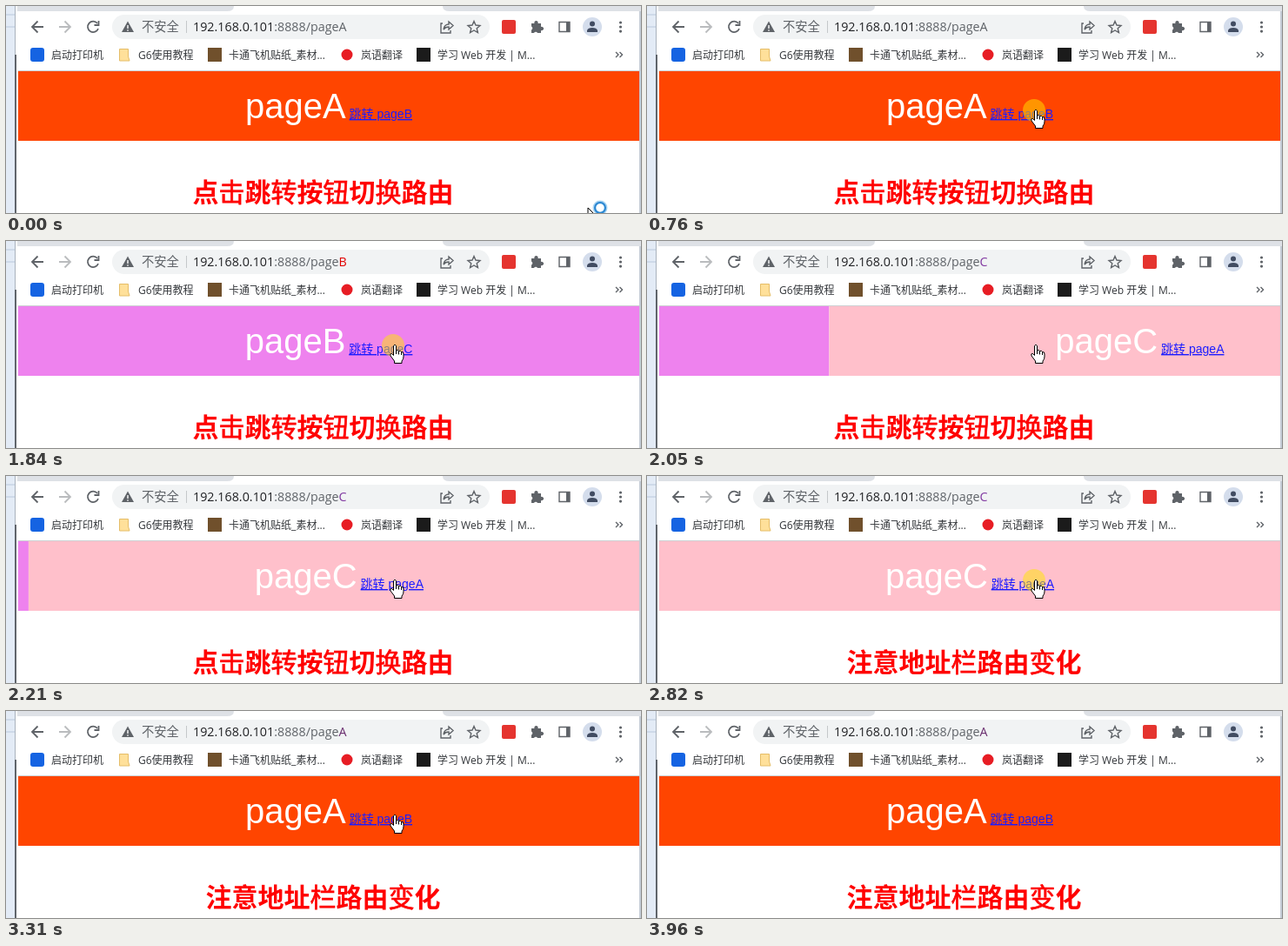
Recreate the animation shown at these times as an HTML page. Size 730 by 238 pixels, loop 4 s.

```html
<!DOCTYPE html>
<html lang="zh-CN">
<head>
<meta charset="utf-8">
<title>Route transition</title>
<style>
  html, body { margin: 0; height: 100%; overflow: hidden; background: #fff; }
  svg { display: block; width: 730px; height: 238px; }
  text { white-space: pre; }
  .ui { font-family: "Open Sans", "Noto Sans CJK SC", sans-serif; }
  .bookmarks { font-size: 12px; fill: #34373b; }
  .line { fill: none; stroke: #5f6368; stroke-width: 1.8; }
  .fine { stroke-width: 1.4; }
  .page { font: 40px "Liberation Sans", Arial, "Noto Sans CJK SC", sans-serif; }
  .gap { font-size: 14px; }
  .link { font-size: 14px; fill: #1c1cff; text-decoration: underline 1px; }
  .caption { font: bold 30px "Noto Sans CJK SC", sans-serif; fill: red; }
  .thin { font-weight: 400; stroke: red; stroke-width: .7; }
  .pointer { fill: #fff; stroke: #000; stroke-linejoin: round; }
</style>
</head>
<body>
<svg viewBox="0 0 730 238">
  <clipPath id="view"><rect x="14" y="75" width="714" height="80"/></clipPath>

  <!-- window frame and tab strip -->
  <rect width="730" height="238" fill="#fff"/>
  <rect width="10" height="238" fill="#e3ebf6"/>
  <path d="M0 10H10M0 24H10" stroke="#b9c8dc"/>
  <path d="M10.500 0V56" stroke="#a9b2bd"/>
  <path d="M11 56V238" stroke="#60656b" stroke-width="2"/>
  <path d="M13 0H730V6H13Z" fill="#dee1e6"/>
  <path d="M254 6q8 0 8 -6H502q0 6 8 6Z" fill="#fff"/>
  <path d="M14 74.5H728" stroke="#cdcfd2"/>
  <path d="M729 6V238" stroke="#c3cbd5" stroke-width="2"/>

  <!-- toolbar -->
  <g class="line">
    <path d="M43 24H30M36.5 17.5L30 24L36.5 30.5"/>
    <path d="M61 24H74M67.5 17.5L74 24L67.5 30.5" style="stroke:#babcbe"/>
    <path d="M105 20A6.2 6.2 0 1 0 106 26M106.5 17V22H101.5"/>
  </g>
  <rect x="122" y="10" width="434" height="28" rx="14" fill="#f1f3f4"/>
  <path d="M140 17.5L147 30H133Z" fill="#5f6368"/>
  <path d="M140 22V26M140 27.3V28.7" stroke="#fff" stroke-width="1.4"/>
  <path d="M207.5 17V31" stroke="#c4c7ca"/>
  <g class="ui" font-size="14.3" fill="#5f6368">
    <text x="156" y="29">不安全</text>
    <text x="215" y="29"><tspan fill="#202124">192.168.0.101</tspan>:8888/page<tspan id="letter"></tspan></text>
  </g>
  <g class="line fine">
    <path d="M502 20H500V31H511V28M503 27Q504 21 509 21V18L514 22.5L509 27V24Q505 24 503 27Z"/>
    <path d="M538 17.5L540 22L545 22.5L541.2 25.7L542.4 30.5L538 28L533.6 30.5L534.8 25.7L531 22.5L536 22Z"/>
    <path d="M636 18.5H648V29.5H636Z"/>
  </g>
  <rect x="570" y="16" width="16" height="16" rx="2" fill="#e5342f"/>
  <path d="M604 20H607.5A2.2 2.2 0 1 1 611.5 20H615V24A2.2 2.2 0 1 1 615 28V31H611A2.2 2.2 0 0 0 607 31H604V27.5A2.2 2.2 0 0 0 604 23.5Z" fill="#5f6368"/>
  <path d="M644 18.5H648V29.5H644Z" fill="#5f6368"/>
  <circle cx="674" cy="24" r="11" fill="#d4ddec"/>
  <g fill="#414c62">
    <circle cx="674" cy="20.5" r="3"/>
    <path d="M668 30V28Q669 25 674 25T680 28V30Z"/>
  </g>
  <path d="M706.5 19v.01m0 5v.01m0 5v.01" stroke="#5f6368" stroke-width="3.2" stroke-linecap="round"/>

  <!-- bookmarks -->
  <rect x="28" y="48" width="16" height="16" rx="3" fill="#1563e2"/>
  <path d="M130.5 49.5H140.5V58L142 63H130.5Z" fill="#ffe09a" stroke="#e5bd68"/>
  <rect x="232" y="48" width="16" height="16" fill="#70502c"/>
  <circle cx="392" cy="56" r="6.5" fill="#e71d24"/>
  <rect x="472" y="48" width="16" height="16" fill="#1b1b1b"/>
  <g class="ui bookmarks">
    <text x="52" y="61">启动打印机</text>
    <text x="152" y="61">G6使用教程</text>
    <text x="256" y="61">卡通飞机贴纸_素材...</text>
    <text x="408" y="61">岚语翻译</text>
    <text x="496" y="61">学习 Web 开发 | M...</text>
  </g>
  <path class="line fine" d="M701 53L704 56L701 59M705.5 53L708.5 56L705.5 59"/>

  <g id="pages" clip-path="url(#view)"></g>
  <text id="caption" class="caption" x="364.5" y="225" text-anchor="middle"></text>

  <!-- pointer -->
  <circle id="click" cx="445" cy="120" r="13" fill="#ffe600" opacity=".5"/>
  <g id="pointer" class="pointer">
    <path id="arrow" d="M0 0V16L3.8 12.5L6.5 18.5L9 17.4L6.5 11.5H11.5Z"/>
    <path id="hand" d="M-1.5 1.5Q0 -1 1.5 1.5V7Q3.5 5.5 4.5 7.5Q6.5 6.5 7.5 8.5Q10 8 10 11V14Q10 17 8 19V21.5H-.5V19L-5 13Q-6 10 -3.5 10.5L-1.5 12.5ZM1.5 7V11M4.5 7.5V11.5M7.5 8.5V12"/>
    <g id="busy" fill="none">
      <circle cx="14" r="6.5" stroke="#a9d4f2" stroke-width="4"/>
      <circle cx="14" r="6" stroke="#2a86d1" stroke-width="2"/>
    </g>
  </g>
</svg>
<script>
const LOOP = 4000, WIDTH = 714, LEFT = 14;
const $ = id => document.getElementById(id);
const colors = { A: "#ff4500", B: "#ee82ee", C: "#ffc0cb" };

// lead: how much earlier the old page leaves than the new one enters
const slides = [
  { from: "A", to: "B", click: 760, start: 895, duration: 370, lead: 20, tint: "#e00000" },
  { from: "B", to: "C", click: 1840, start: 1878, duration: 400, lead: 0, tint: "#8038a0" },
  { from: "C", to: "A", click: 2820, start: 2915.5, duration: 400, lead: 0, tint: "#6b3070" }
];

const captions = ["点击跳转按钮切换路由", "注意地址栏路由变化"].map(text =>
  text.replace(/[击转钮换栏变]/g, '<tspan class="thin">$&</tspan>'));

$("pages").innerHTML = slides.map(({ from, to }) => `
  <g id="page${from}">
    <rect x="${LEFT}" y="75" width="${WIDTH}" height="80" fill="${colors[from]}"/>
    <text class="page" x="371" y="129" text-anchor="middle" fill="#fff">page${from}<tspan class="gap"> </tspan><tspan class="link">跳转 page${to}</tspan></text>
  </g>`).join("");

const clamp = x => Math.min(1, Math.max(0, x));
const mix = (a, b, k) => a + (b - a) * k;
const smooth = x => x * x * (3 - 2 * x);

// CSS "ease": cubic-bezier(.25, .1, .25, 1)
function ease(x) {
  let low = 0, high = 1;
  for (let i = 0; i < 20; i++) {
    const s = (low + high) / 2;
    if (.75 * s - .75 * s * s + s ** 3 < x) low = s; else high = s;
  }
  return .3 * low + 2.4 * low ** 2 - 1.7 * low ** 3;
}

function show(id, visible) {
  $(id).style.display = visible ? "" : "none";
}

function place(name, x) {
  show("page" + name, Math.abs(x) < WIDTH - .1);
  $("page" + name).setAttribute("transform", `translate(${x.toFixed(2)})`);
}

function drawPages(t) {
  const slide = slides.filter(s => t >= s.start - s.lead).pop();
  for (const name in colors) place(name, WIDTH);
  if (slide) {
    const progress = lead => ease(clamp((t - slide.start + lead) / slide.duration));
    place(slide.from, -WIDTH * progress(slide.lead));
    place(slide.to, WIDTH * (1 - progress(0)));
  } else {
    place("A", 0);
  }
  $("letter").textContent = slide ? slide.to : "A";
  $("letter").setAttribute("fill", slide ? slide.tint : "#5f6368");
}

function drawPointer(t) {
  const arrive = smooth(clamp((t - 20) / 410));
  const leave = smooth(clamp((t - 3330) / 380));
  const x = mix(mix(669, 447, arrive), 650, leave);
  const y = mix(mix(232, 119, arrive), 242, leave);
  const onLink = arrive > .93 && leave < .07;
  $("pointer").setAttribute("transform", `translate(${x.toFixed(1)} ${y.toFixed(1)})`);
  show("pointer", leave < 1);
  show("hand", onLink);
  show("arrow", !onLink);
  show("busy", t < 80);
  show("click", slides.some(s => t >= s.click && t < s.start - s.lead));
}

let captionIndex = -1;
function drawCaption(t) {
  const index = t < 2370 ? 0 : 1;
  if (index !== captionIndex) $("caption").innerHTML = captions[captionIndex = index];
}

function draw() {
  const t = performance.now() % LOOP;
  drawPages(t);
  drawPointer(t);
  drawCaption(t);
  requestAnimationFrame(draw);
}
draw();
</script>
</body>
</html>
```
